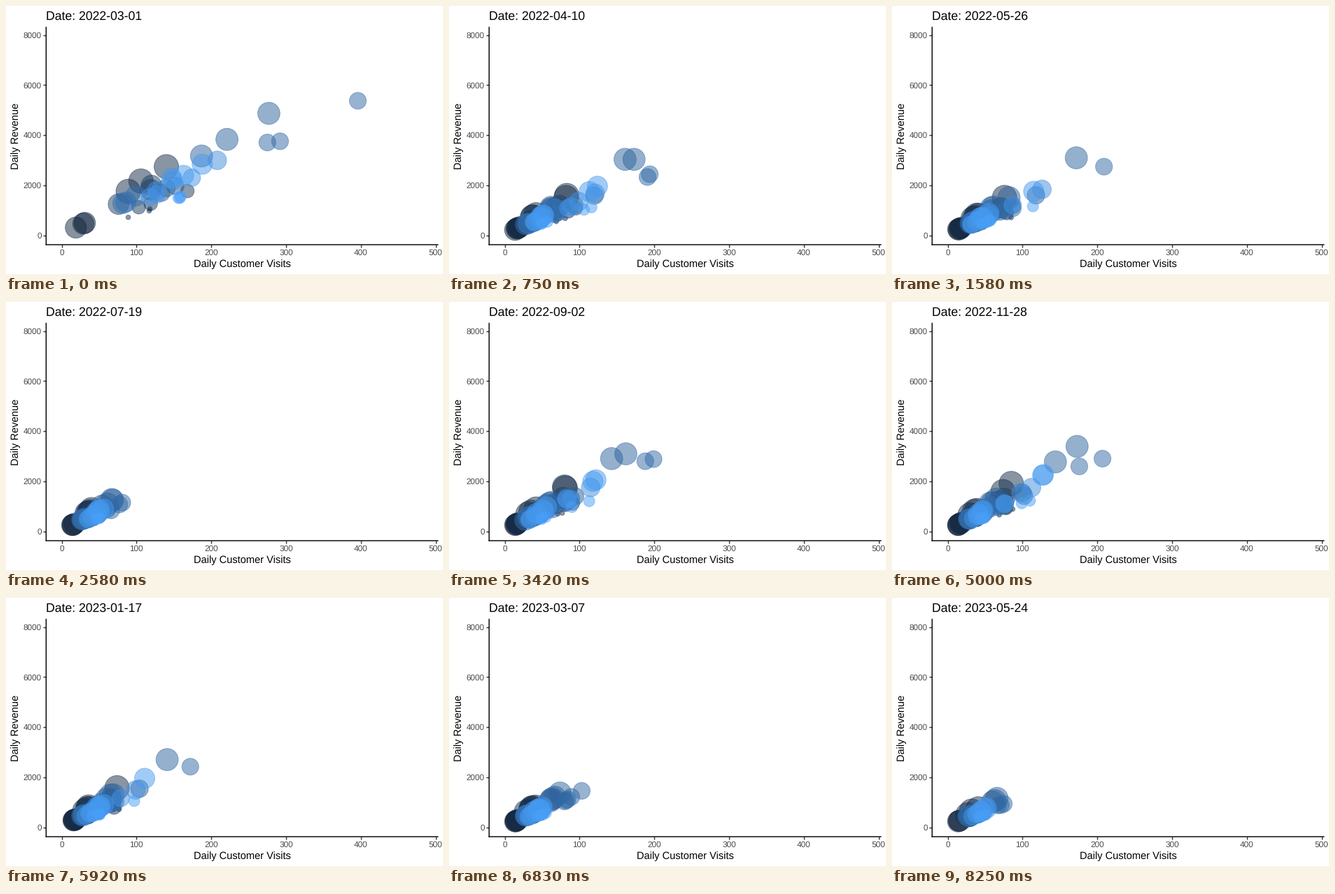
Write a matplotlib script that moves like this. It is 624 px wide and 384 px high and loops after 8.33 s.

```python
import numpy as np
import matplotlib.pyplot as plt
from matplotlib.animation import FuncAnimation

W, H, DPI = 624, 384, 96
STEPS, TICKS, TICK_MS = 100, 245, 34      # data steps shown over one 8330 ms loop
LAST = 449                                # days from first to last date
START = np.datetime64("2022-03-01")
LEFT, RIGHT, TOP, BOTTOM = 57.3, 616.7, 30.5, 342
X0, Y0, XS, YS = 79.5, 328.6, 1.068, 0.03588   # origin and px per unit

plt.rcParams["font.family"] = "Liberation Sans"
plt.rcParams["text.hinting"] = "none"

# region shade: (revenue per visit, weekend visits) of each store
REGIONS = {
    0.00: [(17.8, 18), (21.5, 80), (9.4, 80), (11.9, 85), (17.3, 75)],
    0.45: [(14.6, 108), (18.9, 162), (14.0, 202), (17.0, 60)],
    0.85: [(15.5, 105), (14.5, 88), (16.9, 118), (10.7, 115)],
}
STORES = [(base + 0.05 * k, *store)
          for base, group in REGIONS.items() for k, store in enumerate(group)]
SHADE, PRICE, WEEKEND = np.array(STORES).T

# dot radius grows with the root of the price
RADIUS = 3.8 + 14.2 * np.sqrt((PRICE - PRICE.min()) / np.ptp(PRICE))
SIZES = ((2 * RADIUS - 1) * 72 / DPI) ** 2
DARK, LIGHT = np.array([[18, 38, 63], [72, 159, 248]]) / 255
COLORS = DARK + SHADE[:, None] * (LIGHT - DARK)
COLORS = np.column_stack([COLORS, np.full(len(COLORS), 0.5)])


def simulate():
    """Daily visits and revenue, one row per day and one column per store."""
    rng = np.random.default_rng(8)
    days = np.arange(LAST + 1)[:, None]
    weekday = (days + 1) % 7              # Monday is 0
    busy = np.select([weekday == 5, weekday == 6, weekday == 4], [1, 0.85, 0.08], 0)
    busy[:3] = 1                          # opening holidays
    surge = 1 + 0.2 * np.exp(-days / 20) + 1.15 * np.exp(-((days - 4) / 2.3) ** 2)
    quiet = 9 + 0.33 * WEEKEND
    visits = (quiet + (WEEKEND - quiet) * busy) * surge
    visits = visits * np.exp(rng.normal(0, 0.09, visits.shape))
    visits = np.clip(np.round(visits), 3, 479)
    level = 0.97 - 0.06 * np.cos(2 * np.pi * (days - 20) / 450)
    spread = np.exp(rng.normal(0, 0.03, visits.shape))
    return visits, np.minimum(visits * PRICE * level * spread, 7925)


VISITS, REVENUE = simulate()
SLOT = np.round(np.arange(LAST + 1) * (STEPS - 1) / LAST).astype(int)

fig = plt.figure(figsize=(W / DPI, H / DPI), dpi=DPI, facecolor="white")
ax = fig.add_axes([LEFT / W, 1 - BOTTOM / H, (RIGHT - LEFT) / W, (BOTTOM - TOP) / H])
ax.set_xlim((LEFT - X0) / XS, (RIGHT - X0) / XS)
ax.set_ylim((Y0 - BOTTOM) / YS, (Y0 - TOP) / YS)
ax.spines[["top", "right"]].set_visible(False)
for side in ("left", "bottom"):
    ax.spines[side].set(linewidth=1.07, snap=False)
ax.set_xticks(range(0, 501, 100))
ax.set_yticks(range(0, 8001, 2000))
ax.tick_params(length=2.75, width=1.07, color="#333333",
               labelbottom=False, labelleft=False)


def label(x, y, text, size, **kw):
    return fig.text(x / W, 1 - y / H, text, fontsize=size, va="baseline", **kw)


for v in ax.get_xticks():
    label(X0 + v * XS, 357, f"{v:.0f}", 8.8, ha="center", color="#4d4d4d")
for v in ax.get_yticks():
    label(50.6, Y0 - v * YS + 4.2, f"{v:.0f}", 8.8, ha="right", color="#4d4d4d")
label(337, 374.3, "Daily Customer Visits", 11, ha="center")
label(18, 186.5, "Daily Revenue", 11, ha="center", rotation=90,
      rotation_mode="anchor")
title = label(LEFT, 20, "", 13.2)
dots = ax.scatter([], [], linewidths=0.7, zorder=2)


def draw(tick):
    step = min((tick + 1) * STEPS // TICKS, STEPS - 1)
    rows = SLOT == step
    n = rows.sum()
    # store by store, so lighter ones lie on top
    dots.set_offsets(np.column_stack([VISITS[rows].T.ravel(),
                                      REVENUE[rows].T.ravel()]))
    dots.set_sizes(np.repeat(SIZES, n))
    shades = np.repeat(COLORS, n, axis=0)
    dots.set_facecolor(shades)
    dots.set_edgecolor(shades)
    title.set_text(f"Date: {START + step * LAST // (STEPS - 1)}")
    return dots, title


anim = FuncAnimation(fig, draw, frames=TICKS, interval=TICK_MS,
                     repeat=True, repeat_delay=0)
plt.show()
```
